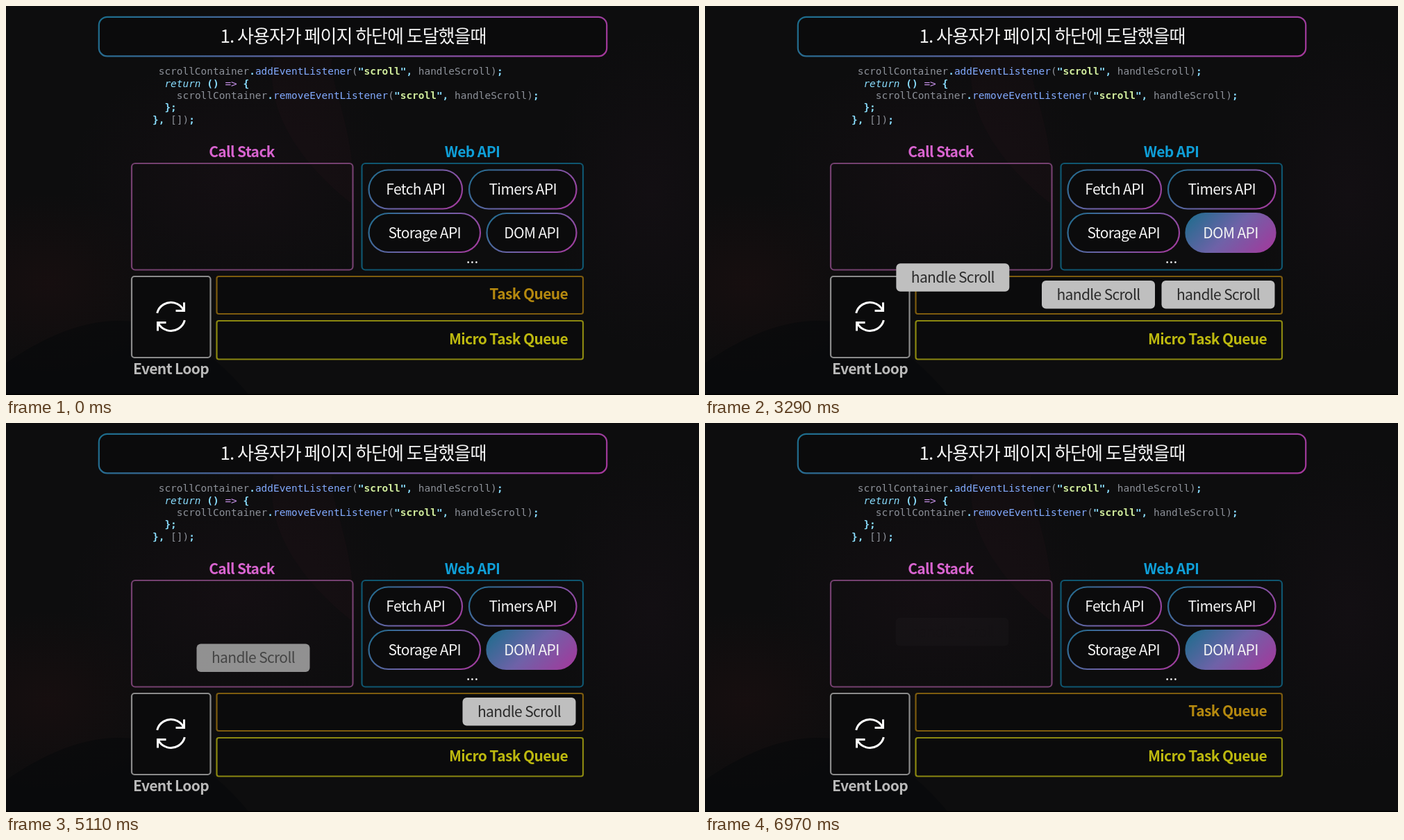
Write an HTML page with a canvas that moves like this. It is 998 px wide and 561 px high and loops after 7.47 s.

```html
<!DOCTYPE html>
<html lang="ko">
<head>
<meta charset="utf-8">
<title>Event loop</title>
<style>
  html, body { margin: 0; width: 100%; height: 100%; overflow: hidden; background: #0d0d0d; }
  canvas { display: block; width: 998px; height: 561px; }
</style>
</head>
<body>
<canvas id="stage"></canvas>
<script>
const W = 998, H = 561, LOOP = 7470, STEP = 40;
const SANS = '"Noto Sans CJK KR", "Noto Sans CJK", "Noto Sans", sans-serif';
const MONO = '"DejaVu Sans Mono", "Noto Sans Mono", monospace';
const TEAL = '#1b6d8c', VIOLET = '#6f62a8', MAGENTA = '#a5379b';

const canvas = document.getElementById('stage');
const ctx = canvas.getContext('2d');
const dpr = window.devicePixelRatio || 1;
canvas.width = W * dpr;
canvas.height = H * dpr;

const clamp = v => Math.min(1, Math.max(0, v));
const smooth = v => { v = clamp(v); return v * v * (3 - 2 * v); };
const lerp = (a, b, p) => a + (b - a) * p;

function label(str, x, cy, color, { size = 21, weight = 400, align = 'center', spacing = -0.65 } = {}) {
  ctx.font = `${weight} ${size}px ${SANS}`;
  ctx.letterSpacing = spacing + 'px';
  ctx.textAlign = align;
  ctx.fillStyle = color;
  ctx.fillText(str, x, cy + size * 0.36);
  ctx.letterSpacing = '0px';
}

function box(x, y, w, h, r, stroke, fill) {
  ctx.beginPath();
  ctx.roundRect(x, y, w, h, r);
  if (fill) { ctx.fillStyle = fill; ctx.fill(); }
  if (stroke) { ctx.strokeStyle = stroke; ctx.lineWidth = 2.2; ctx.stroke(); }
}

// Diagonal teal-to-magenta gradient across a rectangle
function blend(x, y, w, h) {
  const k = (w + h) / 4, cx = x + w / 2, cy = y + h / 2;
  const g = ctx.createLinearGradient(cx - k, cy - k, cx + k, cy + k);
  g.addColorStop(0, TEAL);
  g.addColorStop(0.5, VIOLET);
  g.addColorStop(1, MAGENTA);
  return g;
}

function glow(x, y, r, sx, sy, rgb, alpha) {
  ctx.save();
  ctx.translate(x, y);
  ctx.scale(sx, sy);
  const g = ctx.createRadialGradient(0, 0, 0, 0, 0, r);
  g.addColorStop(0, `rgba(${rgb},${alpha})`);
  g.addColorStop(1, `rgba(${rgb},0)`);
  ctx.fillStyle = g;
  ctx.fillRect(-r, -r, 2 * r, 2 * r);
  ctx.restore();
}

function backdrop() {
  ctx.fillStyle = '#0d0d0e';
  ctx.fillRect(0, 0, W, H);
  glow(60, 400, 130, 1.3, 1, '70,22,22', 0.16);
  glow(330, 250, 200, 1.2, 0.9, '60,25,45', 0.14);
  glow(930, 270, 180, 0.8, 1.3, '50,25,45', 0.14);
  ctx.fillStyle = 'rgba(70,28,36,0.09)';
  ctx.beginPath();
  ctx.moveTo(385, 75);
  ctx.bezierCurveTo(370, 160, 440, 240, 498, 285);
  ctx.bezierCurveTo(510, 190, 460, 100, 470, 75);
  ctx.fill();
  ctx.fillStyle = 'rgba(8,9,10,0.6)';
  ctx.beginPath();
  ctx.moveTo(0, 515);
  ctx.bezierCurveTo(130, 425, 240, 430, 350, 561);
  ctx.lineTo(0, 561);
  ctx.fill();
  ctx.fillStyle = '#000';
  ctx.fillRect(0, 559.5, W, 1.5);
}

const INK = { g: '#8d9199', c: '#89ddff', b: '#82aaff', s: '#d0ec9c', p: '#c792ea' };
const listener = name => [['g', 'scrollContainer'], ['c', '.'], ['b', name], ['g', '('],
  ['c', '"'], ['s', 'scroll'], ['c', '",'], ['g', ' handleScroll)'], ['c', ';']];
const CODE = [
  [1, listener('addEventListener')],
  [2, [['i', 'return'], ['c', ' () '], ['p', '=>'], ['c', ' {']]],
  [4, listener('removeEventListener')],
  [2, [['c', '};']]],
  [0, [['c', '},'], ['g', ' [])'], ['c', ';']]]
];

function code() {
  const size = 14.45, advance = 8.7;
  ctx.textAlign = 'left';
  CODE.forEach(([indent, parts], row) => {
    let x = 211 + indent * advance;
    for (const [kind, str] of parts) {
      const style = kind === 'i' ? 'italic' : kind === 'c' || kind === 's' ? 'bold' : 'normal';
      ctx.font = `${style} ${size}px ${MONO}`;
      ctx.fillStyle = kind === 'i' ? INK.c : INK[kind];
      ctx.fillText(str, x, 99.3 + row * 17.35);
      x += str.length * advance;
    }
  });
}

function loopIcon() {
  ctx.save();
  ctx.translate(237.5, 448);
  ctx.strokeStyle = '#fff';
  ctx.lineWidth = 3;
  for (let i = 0; i < 2; i++) {
    ctx.beginPath();
    ctx.arc(0, 0, 20.5, Math.PI * 1.08, Math.PI * 1.86);
    ctx.moveTo(19, -20.5);
    ctx.lineTo(19, -8.5);
    ctx.lineTo(7, -8.5);
    ctx.stroke();
    ctx.rotate(Math.PI);
  }
  ctx.restore();
}

function pill(str, x, y, w, fillAlpha = 0) {
  const h = 56, g = blend(x, y, w, h);
  box(x, y, w, h, h / 2, g, '#0b0b0c');
  if (fillAlpha > 0) {
    ctx.globalAlpha = fillAlpha;
    box(x, y, w, h, h / 2, null, g);
    ctx.globalAlpha = 1;
  }
  label(str, x + w / 2, y + h / 2, '#f4f4f4', { weight: 300 });
}

function scene(domFill) {
  backdrop();
  box(133.8, 15.8, 731.4, 56.6, 12, blend(133, 15, 733, 58), '#0b0b0c');
  label('1. 사용자가 페이지 하단에 도달했을때', 500, 44, '#f6f6f6', { size: 26, weight: 300, spacing: -1 });
  code();

  const bold = { weight: 600 };
  label('Call Stack', 339.5, 210, '#d964d0', bold);
  label('Web API', 671.5, 210, '#0f9fd8', bold);
  box(181, 227, 318.5, 153.5, 5, '#74406f');
  box(512.5, 227, 318.5, 153.5, 5, '#0f5670');
  box(181, 390, 113.5, 117, 4, '#8b8b8b', '#0b0b0c');
  box(303.5, 390, 527.5, 54, 3, '#7d5b0e', '#0b0b0c');
  box(303.5, 454, 527.5, 55.5, 3, '#8b8810', '#0b0b0c');

  pill('Fetch API', 522.5, 236.5, 134.5);
  pill('Timers API', 667, 236.5, 154.5);
  pill('Storage API', 522.5, 299, 160.5);
  pill('DOM API', 692.5, 299, 129, domFill);
  label('...', 671.5, 363.5, '#f4f4f4', { spacing: 0 });

  const right = { weight: 600, align: 'right' };
  label('Task Queue', 809, 415, '#b5890f', right);
  label('Micro Task Queue', 809, 480, '#bdb90f', right);
  label('Event Loop', 237.5, 523.5, '#bababa', bold);
  loopIcon();
}

function task(x, y, alpha) {
  if (alpha <= 0) return;
  ctx.globalAlpha = alpha;
  box(x, y, 163, 40.5, 6, null, '#bfbfbf');
  label('handle Scroll', x + 81.5, y + 20.2, '#2a2a2a');
  ctx.globalAlpha = 1;
}

const SLOTS = [313.5, 485, 657.5];
const EXITS = [3090, 4550, 6050];
const ENTER = 1250, ENTER_GAP = 380;

// Milliseconds into a move, advancing in whole steps
const stepped = (t, start, span) => Math.min(span, Math.floor((t - start) / STEP) * STEP) + 10;

function drawTask(i, t) {
  const since = stepped(t, EXITS[i], 920);
  if (t < EXITS[i]) {
    const shown = 500 + stepped(t, 500, 1880);
    task(SLOTS[i], 396, clamp((shown - ENTER - i * ENTER_GAP) / ENTER_GAP));
  } else if (!(t >= EXITS[i + 1])) {
    // Slide to the stack, then rise and fade
    const x = lerp(SLOTS[i], 274.5, smooth(since / 230));
    const rise = clamp((since - 440) / 500);
    const y = lerp(396, 332, smooth((since - 40) / 400)) - 52 * rise;
    task(x, y, 1 - rise);
  }
}

function frame(now) {
  const t = now % LOOP;
  ctx.setTransform(dpr, 0, 0, dpr, 0, 0);
  scene(t < 500 ? 0 : clamp(stepped(t, 500, 1880) / 740));
  for (let i = 2; i >= 0; i--) drawTask(i, t);
  requestAnimationFrame(frame);
}

const origin = performance.now();
const tick = () => frame(Math.max(0, performance.now() - origin));
requestAnimationFrame(function run() {
  draw(performance.now() - origin);
  requestAnimationFrame(run);
});

function draw(elapsed) {
  const t = Math.max(0, elapsed) % LOOP;
  ctx.setTransform(dpr, 0, 0, dpr, 0, 0);
  scene(t < 500 ? 0 : clamp(stepped(t, 500, 1880) / 740));
  for (let i = 2; i >= 0; i--) drawTask(i, t);
}
</script>
</body>
</html>
```
